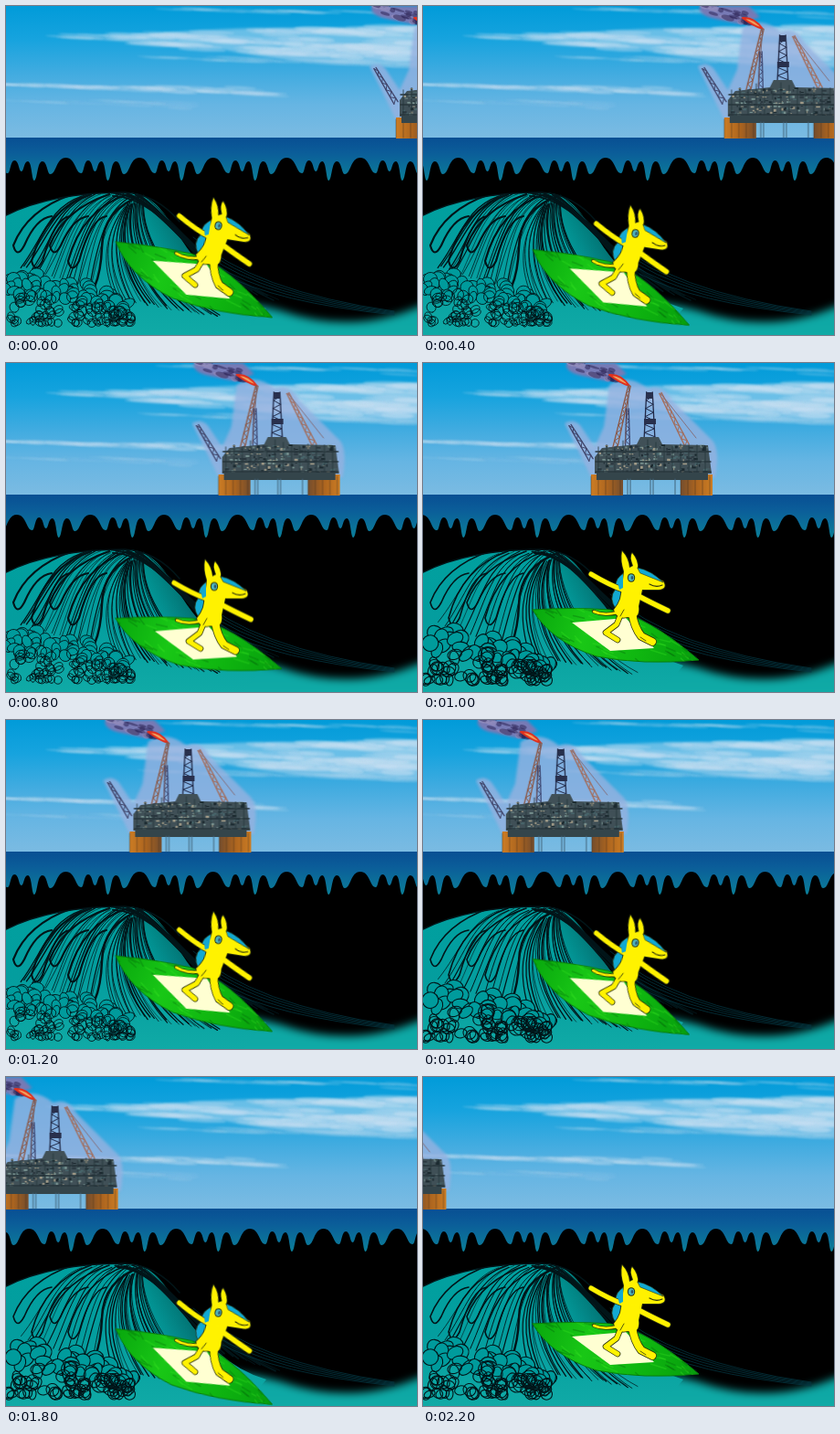
An HTML page with a canvas for the animation above (2.4 s loop, 450 by 360 pixels).

```html
<!DOCTYPE html>
<html lang="en">
<head>
<meta charset="utf-8">
<title>Surfing under the rig</title>
<style>
html, body { margin: 0; width: 100%; height: 100%; overflow: hidden; background: #000; }
canvas { display: block; width: 450px; height: 360px; }
</style>
</head>
<body>
<canvas id="stage" width="450" height="360"></canvas>
<script>
const W = 450, H = 360, STEP = 200, STEPS = 12, HORIZON = 144;
const g = document.getElementById('stage').getContext('2d');

function seeded(seed) {
  return () => {
    seed = (seed * 16807) % 2147483647;
    return seed / 2147483647;
  };
}

function layer(draw) {
  const c = document.createElement('canvas');
  c.width = W;
  c.height = H;
  const ctx = c.getContext('2d');
  ctx.lineCap = ctx.lineJoin = 'round';
  draw(ctx);
  return c;
}

function ramp(c, x0, y0, x1, y1, ...colors) {
  const r = c.createLinearGradient(x0, y0, x1, y1);
  colors.forEach((col, i) => r.addColorStop(i / (colors.length - 1), col));
  return r;
}

function shape(c, d, fill, stroke, width = 1) {
  const p = new Path2D(d);
  if (fill) { c.fillStyle = fill; c.fill(p); }
  if (stroke) { c.strokeStyle = stroke; c.lineWidth = width; c.stroke(p); }
}

function blob(c, x, y, rx, ry, color, turn = 0) {
  c.fillStyle = color;
  c.beginPath();
  c.ellipse(x, y, rx, ry, turn, 0, 7);
  c.fill();
}

const backdrop = layer(c => {
  const rnd = seeded(71);
  c.fillStyle = ramp(c, 0, 0, 0, HORIZON, '#019bd9', '#16a3de', '#3fabe0', '#66b5e3', '#7bbbe2');
  c.fillRect(0, 0, W, HORIZON);

  // A wisp band widens from its start to its end
  function wisps(x0, x1, y0, y1, spread, n, alpha) {
    for (let i = 0; i < n; i++) {
      const u = rnd(), wide = spread * (0.15 + u);
      blob(c, x0 + (x1 - x0) * u, y0 + (y1 - y0) * u + (rnd() - 0.5) * wide,
        (x1 - x0) * (0.04 + rnd() * 0.07), 0.8 + wide * 0.06,
        `rgba(205,226,243,${alpha * (0.4 + rnd() * 0.6)})`, 0.05);
    }
  }
  c.filter = 'blur(1.5px)';
  shape(c, 'M105 36Q210 24 300 24T460 21V65Q330 68 235 47Q170 42 105 36Z', 'rgba(190,219,241,.5)');
  c.filter = 'blur(0.8px)';
  wisps(75, 460, 35, 44, 38, 110, 0.42);
  wisps(140, 460, 56, 64, 9, 30, 0.25);
  wisps(170, 460, 3, 10, 7, 24, 0.35);
  wisps(-30, 280, 85, 94, 8, 60, 0.4);
  wisps(-30, 240, 102, 110, 8, 24, 0.16);
  c.filter = 'none';
  c.fillStyle = ramp(c, 0, HORIZON, 0, 194, '#084f93', '#0b5d99', '#0b7099', '#0b8298');
  c.fillRect(0, HORIZON, W, 56);
});

// Platform with its left leg at x = 30
const rig = layer(c => {
  const rnd = seeded(19);
  const line = (x0, y0, x1, y1, col, w = 1) => shape(c, `M${x0} ${y0}L${x1} ${y1}`, null, col, w);

  function lattice(x0, y0, x1, y1, wide, col) {
    const d = Math.hypot(x1 - x0, y1 - y0), n = Math.round(d / 4.5);
    const at = (k, s) => {
      const w = wide * (1 - k * 0.5) * s / 2;
      return [x0 + (x1 - x0) * k + (y0 - y1) / d * w, y0 + (y1 - y0) * k + (x1 - x0) / d * w];
    };
    for (const s of [-1, 1]) line(...at(0, s), ...at(1, s), col, 1.3);
    for (let i = 0; i < n; i++) {
      const s = i % 2 ? 1 : -1;
      line(...at(i / n, s), ...at((i + 1) / n, -s), col);
    }
  }

  c.filter = 'blur(1.5px)';
  shape(c, 'M1 66Q10 60 18 68L34 92 44 70 50 24Q70 10 92 28Q108 22 118 40L160 82Q172 90 166 125H30L20 104Z', 'rgba(150,178,224,.8)');
  shape(c, 'M3 0Q1 10 20 14L48 20 69 12 57 0Z', '#777ab5');
  c.filter = 'blur(0.6px)';
  for (let i = 0; i < 30; i++) {
    const u = rnd();
    blob(c, 8 + u * 48, 1 + u * 13 + (rnd() - 0.5) * 12, 3 + rnd() * 5, 1 + rnd() * 2,
      i % 3 ? 'rgba(48,38,88,.55)' : 'rgba(151,143,190,.6)', 0.3);
  }
  c.filter = 'none';
  shape(c, 'M50 13Q63 12 72 25Q62 22 50 13Z', '#f2a05c', '#e0301d', 2);

  lattice(56, 94, 72, 25, 5, '#8c5846');
  lattice(70, 94, 70, 50, 5, '#3c456f');
  lattice(94, 94, 94, 32, 13, '#202846');
  lattice(135, 90, 106, 33, 5, '#a36d5c');
  lattice(30, 106, 7, 68, 5, '#404469');
  line(106, 33, 145, 82, '#85707c');
  line(72, 25, 67, 88, '#755d62');
  c.fillStyle = '#28304d';
  c.fillRect(90, 32, 8, 7);
  c.fillRect(88, 61, 13, 6);

  // Deck modules, all built from small seeded boxes
  shape(c, 'M34 121V103L42 93 80 89 84 81H104L108 89 158 90 162 121Z', '#405057');
  const paints = ['#1b292f', '#76908e', '#48656b', '#a19b88', '#29363e'];
  for (let i = 0; i < 230; i++) {
    c.fillStyle = paints[i % paints.length];
    c.fillRect(37 + rnd() * 120, 89 + rnd() * 31, 0.7 + rnd() * 4, 0.7 + rnd() * 2.3);
  }
  for (let x = 38; x < 160; x += 9) {
    const mast = rnd() * 8;
    line(x, 92 - mast, x, 119, '#25353c', 0.8);
  }
  for (const y of [97, 108, 119]) line(35, y, 161, y, '#27363c', 1.4);

  const copper = ['#cc7d24', '#ad651f', '#744d2d'];
  for (const x of [30, 128]) {
    const left = x === 30;
    c.fillStyle = ramp(c, x, 0, x + 35, 0, ...(left ? copper : [...copper].reverse()));
    c.fillRect(x, 122, 35, 23);
    for (let i = 0; i < 5; i++) line(x + i * 8, 124, x + i * 8, 144, 'rgba(66,47,34,.45)');
  }
  c.fillStyle = '#34454b';
  c.fillRect(36, 120, 122, 8);
  for (const x of [70, 73, 95, 98, 122]) line(x, 127, x, 144, '#42647b');
});

const sea = c => ramp(c, 0, 204, 0, H, '#00a09f', '#049d9e', '#10aaa6');
const ink = '#021519';

// Strokes blended between two cubic curves
function fan(c, a, b, n, rnd, width = 1) {
  for (let i = 0; i < n; i++) {
    const q = a.map((v, j) => v + (b[j] - v) * i / (n - 1) + (rnd() - 0.5) * 4);
    shape(c, `M${q[0]} ${q[1]}C${q.slice(2).join(' ')}`, null, ink, width * (0.5 + rnd()));
  }
}

function makeWave(bold) {
  return layer(c => {
    const rnd = seeded(bold ? 311 : 97);
    c.filter = 'blur(5px)';
    shape(c, 'M180 375V315Q260 322 300 333Q385 363 465 323V375Z', sea(c));
    c.filter = 'none';
    const body = 'M0 229Q50 204 130 204C180 204 180 260 232 301Q255 322 285 331L260 360H0Z';
    const shade = ramp(c, 165, 285, 260, 235, 'rgba(0,0,0,0)', 'rgba(0,0,0,.7)');
    shape(c, body, sea(c));
    c.save();
    c.clip(new Path2D(body));
    c.fillStyle = shade;
    c.fillRect(140, 200, 140, 112);

    // Hanging drips, each a narrow loop below the crest
    for (let i = 0; i < 4; i++) {
      const x = 8 + i * 20, y = 262 + (i % 2) * 17;
      shape(c, `M${x + 65} 206Q${x + 15} 223 ${x} ${y}q4 15 12 0Q${x + 25} 232 ${x + 42} 230`,
        null, ink, bold ? 1.6 : 2.2);
    }
    fan(c, [85, 207, 48, 220, 40, 255, 16, 285], [140, 207, 112, 222, 104, 258, 94, 308],
      bold ? 12 : 20, rnd);
    // Barrel
    fan(c, [130, 218, 108, 247, 104, 281, 118, 320], [150, 212, 150, 255, 182, 308, 235, 340],
      bold ? 25 : 30, rnd);
    shape(c, 'M150 207Q106 222 105 264 104 291 97 307', null, ink, 2.5);
    c.restore();
    // Back of the crest
    fan(c, [115, 206, 165, 207, 185, 255, 235, 302], [150, 208, 178, 228, 218, 288, 300, 322],
      12, rnd, 1.5);
    shape(c, 'M0 229Q50 204 130 204Q165 206 190 236', null, ink, 1.5);
    for (let i = 0; i < 5; i++) {
      shape(c, `M${205 + i * 8} ${253 + i * 10}Q${270 + i * 6} ${312 + i * 3} 425 ${334 + i}`,
        null, 'rgba(5,56,68,.75)');
    }

    // Foam: wide loops on top, tighter scribbles below
    const loops = bold ? 115 : 150;
    for (let i = 0; i < loops; i++) {
      const v = i / loops, x = rnd() * 138;
      const top = 287 + x * x * 0.0021;
      const y = top + (347 - top) * Math.min(1, v + rnd() * 0.2);
      const r = (bold ? 10 : 8) - v * 4;
      c.beginPath();
      c.ellipse(x, y, r, r * (0.6 + rnd() * 0.4), rnd() * 3, 0, 7);
      if (v < 0.4) { c.fillStyle = '#009b9c'; c.fill(); }
      c.strokeStyle = ink;
      c.lineWidth = bold ? 1.1 : 0.9;
      c.stroke();
    }
  });
}

const waves = [makeWave(false), makeWave(true)];

// Level pose
const surfer = layer(c => {
  const rnd = seeded(43);
  const board = 'M120 270Q165 267 205 270 245 276 302 325 240 331 190 321 140 305 120 270Z';
  shape(c, board, ramp(c, 120, 270, 300, 325, '#08a70d', '#19c716', '#0fb610', '#079e0d'), '#087d0c');
  c.save();
  c.clip(new Path2D(board));
  for (let i = 0; i < 110; i++) {
    shape(c, `M${115 + rnd() * 185} ${265 + rnd() * 64}l${5 + rnd() * 12} ${2 + rnd() * 6}`, null,
      i % 2 ? 'rgba(3,105,10,.35)' : 'rgba(54,223,32,.35)', 1.5);
  }
  c.restore();
  shape(c, 'M163 284L222 279 253 312 205 315Z', '#ffffd2');

  const line = '#29300d', yellow = '#fff200', blue = '#12a9d2';
  const torso = 'M217 245Q219 258 209 270 212 281 224 278 238 281 236 266L240 248Z';
  const head = 'M220 228Q216 216 218 206 225 213 226 224L230 222Q226 212 229 208 236 216 235 225L263 239Q268 247 258 248L240 248Q228 252 218 246Z';
  const limbs = [
    ['M213 273Q198 277 187 272', 2.5],
    ['M217 274L212 286 200 295 213 303', 5],
    ['M229 273Q231 289 239 299L251 305', 8],
    ['M221 249Q204 243 184 231', 5],
    ['M234 254Q249 262 268 271', 5.5]
  ];
  shape(c, 'M221 229Q209 236 211 247 202 258 212 270L224 262Z', blue, line, 0.8);
  // Outlines first so that the joints stay open
  for (const [d, w] of limbs) shape(c, d, null, line, w + 1.6);
  for (const d of [torso, head]) shape(c, d, null, line, 1.8);
  for (const [d, w] of limbs) shape(c, d, null, yellow, w);
  for (const d of [torso, head]) shape(c, d, yellow);
  shape(c, 'M235 224Q250 227 263 240L238 230Z', blue, line, 0.6);
  shape(c, 'M219 231Q212 239 215 248L219 246Z', blue);
  blob(c, 228, 235, 4.2, 4.8, line);
  blob(c, 228, 235, 3.2, 3.8, '#4eb4bd');
  blob(c, 229, 235, 1.3, 2, '#31546b');
  shape(c, 'M248 242Q255 246 262 243', null, line, 1.2);
  shape(c, 'M220 270L216 277M238 300l6 4', null, line, 0.8);
});

// Oil edge: width of each bulge, its top, and the drip after it
const PERIOD = 80.6;
const bulges = [[34, 166, 183], [15, 169, 181], [14, 170, 191], [PERIOD - 63, 170, 184]];

function drawOil(k) {
  let x = 48.5 - k * PERIOD / 6 - PERIOD, y = 184;
  g.beginPath();
  g.moveTo(x, H);
  g.lineTo(x, y);
  for (let i = 0; x < W; i++) {
    const [w, top, dip] = bulges[i % bulges.length];
    const mid = x + w / 2, end = x + w;
    g.bezierCurveTo(x + w * 0.2, y, mid - w * 0.32, top, mid, top);
    g.bezierCurveTo(mid + w * 0.32, top, end - w * 0.2, dip, end, dip);
    x = end;
    y = dip;
  }
  g.lineTo(x, H);
  g.fillStyle = '#000';
  g.fill();
}

// Six-beat bob: the board noses down for four beats, then levels out
const bob = [0, 3.5, 8.5, 17.5, 9.5, 0];

function drawSurfer(beat) {
  const tilted = beat < 4;
  g.save();
  g.translate(tilted ? 206 : 211, (tilted ? 299.5 : 297.5) + bob[beat]);
  if (tilted) g.rotate(0.156);
  g.drawImage(surfer, -211, -297.5);
  g.restore();
}

function draw(k) {
  g.drawImage(backdrop, 0, 0);
  g.drawImage(rig, 397 - 48.6 * k, 0);
  // The rig stays above the waterline
  drawOil(k % 6);
  g.drawImage(waves[k % 2], 0, 0);
  drawSurfer(k % 6);
}

let shown = -1;
function tick() {
  const k = Math.floor(performance.now() / STEP) % STEPS;
  if (k !== shown) draw(shown = k);
  requestAnimationFrame(tick);
}
tick();
</script>
</body>
</html>
```
